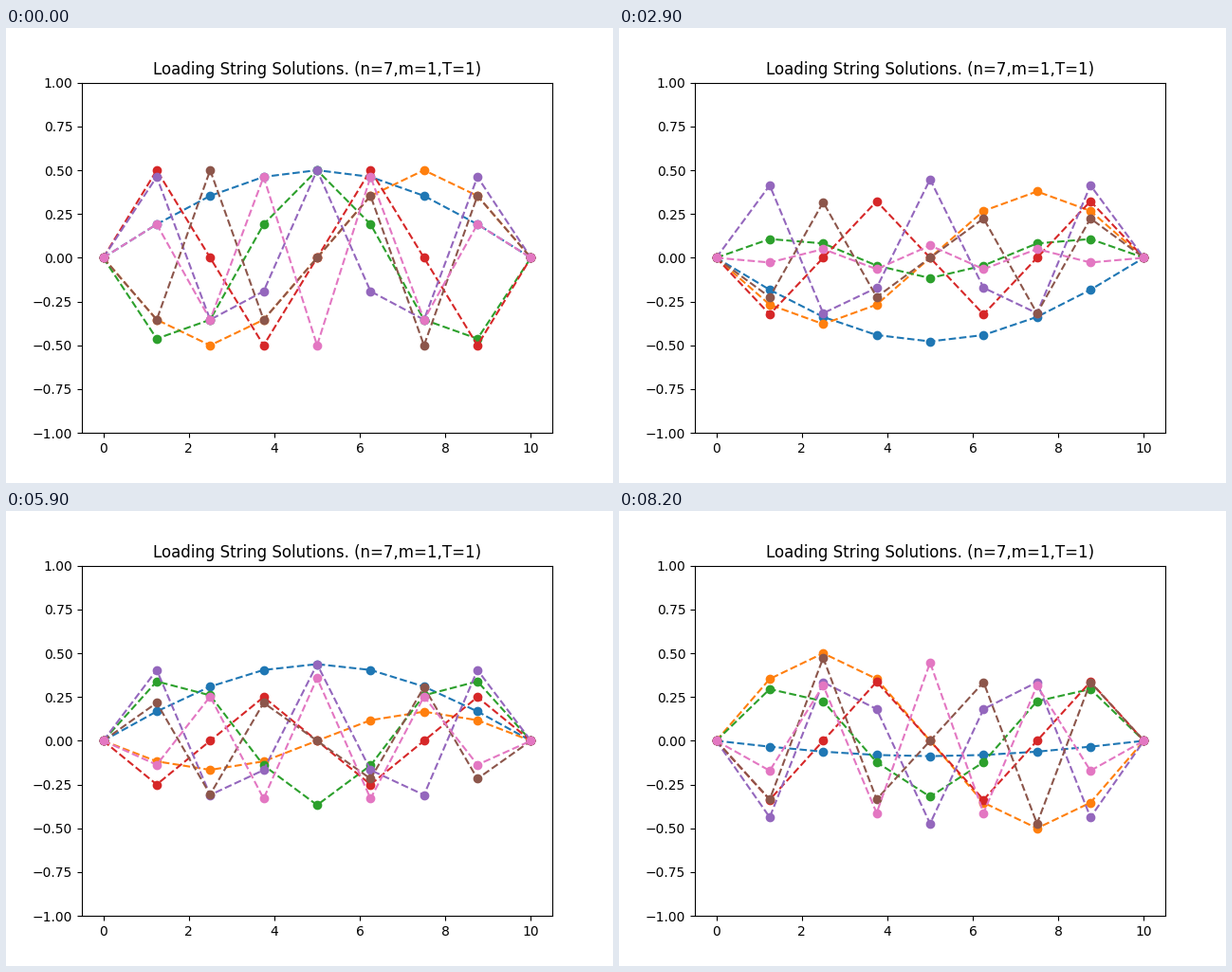
A matplotlib script for the animation above (8300 ms loop, 640 by 480 pixels).

```python
import numpy as np
import matplotlib.pyplot as plt
from matplotlib.animation import FuncAnimation

N, MASS, TENSION, LENGTH = 7, 1, 1, 10
FRAMES, INTERVAL, DT = 83, 100, 0.3

# Normal modes of a string loaded with N equal masses, ends fixed.
modes = np.arange(1, N + 1)
signs = np.array([1, -1, -1, 1, 1, -1, 1])
x = np.linspace(0, LENGTH, N + 2)
shapes = np.sqrt(2 / (N + 1)) * signs[:, None] * np.sin(
    np.outer(modes, np.arange(N + 2)) * np.pi / (N + 1))
omega = 2 * np.sqrt(TENSION * N / (MASS * LENGTH)) * np.sin(
    modes * np.pi / (2 * (N + 1)))

fig, ax = plt.subplots(figsize=(6.4, 4.8), dpi=100)
lines = [ax.plot(x, shape, "o--")[0] for shape in shapes]
ax.set_xlim(-0.5, 10.5)
ax.set_ylim(-1, 1)
ax.set_title(f"Loading String Solutions. (n={N},m={MASS},T={TENSION})")


def update(frame):
    swing = np.cos(omega * frame * DT)
    for line, shape, s in zip(lines, shapes, swing):
        line.set_ydata(shape * s)
    return lines


anim = FuncAnimation(fig, update, frames=FRAMES, interval=INTERVAL,
                     repeat=True, repeat_delay=0)
plt.show()
```
